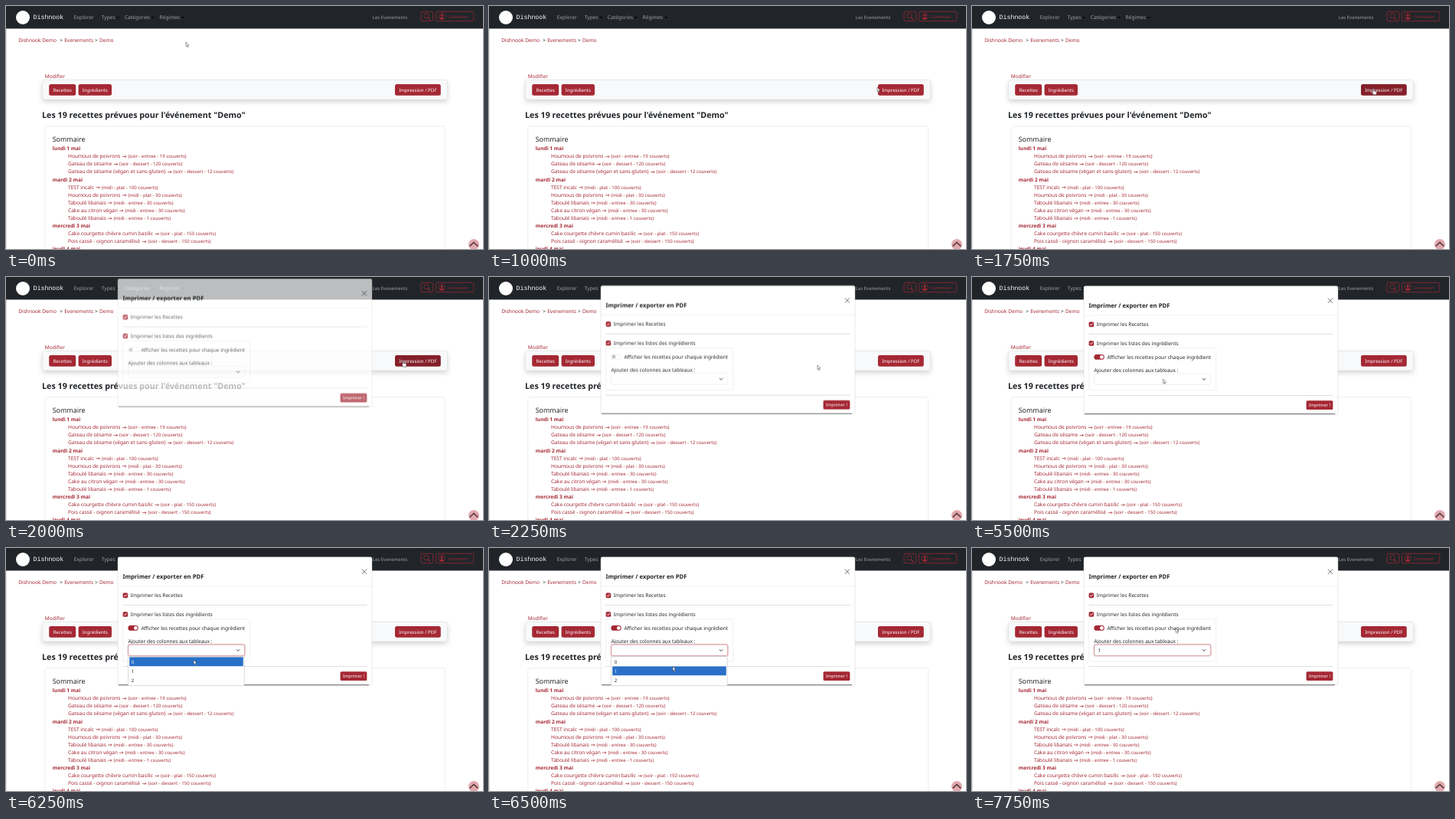
Write an HTML page that moves like this. It is 623 by 317 pixels and loops after 8000 ms.

```html
<!DOCTYPE html>
<html lang="fr">
<head>
<meta charset="utf-8">
<title>Impression des recettes</title>
<style>
html, body { margin: 0; width: 100%; height: 100%; overflow: hidden; background: #fff; }
svg { display: block; width: 623px; height: 317px; }
text { font: 6.6px "Noto Sans", sans-serif; fill: #212529; text-rendering: geometricPrecision; white-space: pre; }
.red text, text.red { fill: #a52834; }
.btn rect { fill: #a52834; }
.btn text { fill: #fff; font-size: 6.13px; }
.nav text { fill: #a0a3a5; }
.nav .caret { fill: #a0a3a5; }
.nav .brand { font: 8.25px "Liberation Mono", monospace; fill: #fff; }
.line { fill: none; stroke: #a52834; stroke-width: .7; }
.bold { font-weight: 700; }
.toolbar { filter: drop-shadow(0 3px 3px rgba(0, 0, 0, .16)); }
.small { font-size: 6.09px; }

/* One 8 s timeline in 250 ms beats (3.125 % each). */
.anim { animation: 8s step-end infinite; }
#cursor { animation-name: move; }
#arrow { animation-name: arrow; }
#hand { animation-name: hand; }
#print { animation-name: print; }
#modal { animation-name: modal; }
#off { animation-name: off; }
#on { animation-name: on; }
#ring { animation-name: ring; }
#menu { animation-name: menu; }
#pick { animation-name: pick; }
#zero { animation-name: zero; }
#one { animation-name: one; }
#value { animation-name: value; }

@keyframes move {
  0% { transform: translate(235px, 47px); }
  3.125% { transform: translate(262px, 53px); }
  6.25% { transform: translate(345px, 72px); }
  9.375% { transform: translate(448px, 95px); }
  12.5% { transform: translate(507px, 106px); }
  15.625%, 21.875% { transform: translate(523.5px, 107.5px); }
  25% { transform: translate(518px, 109px); }
  28.125% { transform: translate(429px, 115px); }
  31.25% { transform: translate(318px, 103px); }
  34.375% { transform: translate(239px, 88px); }
  37.5% { transform: translate(246px, 74px); }
  40.625% { transform: translate(268px, 86px); }
  43.75% { transform: translate(318px, 108px); }
  46.875% { transform: translate(352px, 120.7px); }
  50% { transform: translate(260px, 77px); }
  53.125% { transform: translate(243px, 96px); }
  56.25% { transform: translate(260px, 128px); }
  62.5% { transform: translate(181px, 108px); }
  65.625% { transform: translate(168px, 103px); }
  68.75%, 71.875% { transform: translate(249.5px, 133px); }
  78.125% { transform: translate(245px, 146px); }
  81.25%, 87.5% { transform: translate(240px, 154.5px); }
  90.625% { transform: translate(246px, 143px); }
  93.75% { transform: translate(259px, 119px); }
  96.875%, 100% { transform: translate(266px, 104.5px); }
}
@keyframes arrow { 0%, 28.125%, 100% { opacity: 1; } 15.625% { opacity: 0; } }
@keyframes hand { 0%, 28.125%, 100% { opacity: 0; } 15.625% { opacity: 1; } }
@keyframes print { 0%, 28.125%, 100% { fill: #a52834; } 15.625%, 21.875% { fill: #842029; } }
@keyframes modal {
  0% { opacity: 0; transform: translateY(-20px); }
  25% { opacity: .7; transform: translateY(-9.5px); }
  28.125% { opacity: 1; transform: translateY(-.4px); }
  31.25%, 100% { opacity: 1; transform: none; }
}
@keyframes off { 0% { opacity: 1; } 65.625%, 100% { opacity: 0; } }
@keyframes on { 0% { opacity: 0; } 65.625%, 100% { opacity: 1; } }
@keyframes ring { 0% { opacity: 0; } 71.875%, 100% { opacity: 1; } }
@keyframes menu { 0%, 87.5%, 100% { opacity: 0; } 71.875% { opacity: 1; } }
@keyframes pick {
  0% { opacity: 0; transform: translateY(-12px); }
  78.125% { opacity: 1; transform: translateY(-12px); }
  81.25%, 100% { opacity: 1; transform: none; }
}
@keyframes zero { 0%, 81.25%, 100% { fill: #212529; } 78.125% { fill: #fff; } }
@keyframes one { 0% { fill: #212529; } 81.25%, 100% { fill: #fff; } }
@keyframes value { 0% { opacity: 0; } 87.5%, 100% { opacity: 1; } }
</style>
</head>
<body>
<svg viewBox="0 0 623 317">
  <defs>
    <path id="caret" class="caret" d="M0 0h4l-2 2z"/>
    <g id="check">
      <rect width="6.6" height="6.6" rx="1.6" fill="#a52834"/>
      <path d="M1.7 3.4l1.2 1.2 2.1-2.5" fill="none" stroke="#fff" stroke-linecap="round" stroke-linejoin="round"/>
    </g>
  </defs>

  <rect width="623" height="317" fill="#fff"/>
  <path d="M.4 29v288" stroke="#d4d4d4" stroke-width=".8"/>

  <g class="nav">
    <rect width="623" height="29.5" fill="#212529"/>
    <circle cx="22" cy="15" r="9" fill="#fff"/>
    <text class="brand" x="35.6" y="17.2">Dishnook</text>
    <text x="88.7" y="17.4">Explorer</text>
    <text x="124.8" y="17.4">Types</text><use href="#caret" x="144.3" y="14.2"/>
    <text x="154.8" y="17.4">Catégories</text><use href="#caret" x="190" y="14.2"/>
    <text x="200.6" y="17.4">Régimes</text><use href="#caret" x="229" y="14.2"/>
    <text x="478.8" y="17" style="font-size:6px">Les Evenements</text>
    <g class="line">
      <rect x="542" y="7.3" width="15.7" height="12.4" rx="2"/>
      <rect x="561.4" y="7.3" width="49.4" height="12.4" rx="2"/>
      <circle cx="549" cy="12.8" r="3.2"/><path d="M551.4 15.2l2.6 2.6" stroke-width="1.1"/>
      <circle cx="569.2" cy="13.5" r="4.1"/>
    </g>
    <circle cx="569.2" cy="12.3" r="1.6" fill="#a52834"/>
    <path d="M566.2 16.1q3-3.2 6 0a4.1 4.1 0 0 1-6 0" fill="#a52834"/>
    <text x="576.9" y="15.7" style="font-size:5.3px;fill:#9a2936">Connexion</text>
  </g>

  <g class="red">
    <text x="16.2" y="47.2">Dishnook Demo</text>
    <text x="76.2" y="47.2">Evenements</text>
    <text x="121.9" y="47.2">Demo</text>
    <text x="50.8" y="93.7">Modifier</text>
  </g>
  <text x="70.3" y="47.2">&gt;</text>
  <text x="115.9" y="47.2">&gt;</text>

  <rect class="toolbar" x="47.7" y="96.5" width="528.8" height="25.4" rx="3" fill="#f8f9fa" stroke="#dedfe0" stroke-width=".6"/>
  <g class="btn">
    <rect x="56.2" y="102" width="35" height="14.7" rx="2.5"/><text x="61.5" y="111.6">Recettes</text>
    <rect x="94.6" y="102" width="43.4" height="14.7" rx="2.5"/><text x="99.7" y="111.6">Ingrédients</text>
    <rect id="print" class="anim" x="508" y="102" width="59.8" height="14.7" rx="2.5"/><text x="513.2" y="111.6">Impression / PDF</text>
  </g>

  <text class="bold" x="47" y="146.2" style="font-size:10.72px">Les 19 recettes prévues pour l'événement "Demo"</text>
  <rect x="50.8" y="156.8" width="523" height="180" rx="3" fill="#fff" stroke="#e0e1e2" stroke-width=".6"/>
  <text x="60.7" y="177.3" style="font-size:8.93px">Sommaire</text>
  <g id="list" class="red"></g>

  <circle cx="611" cy="311" r="7" fill="#e0a9ae"/>
  <path d="M605.7 313.4l5.3-5 5.3 5" fill="none" stroke="#5b3b40" stroke-width="1.5"/>

  <g id="modal" class="anim">
    <rect x="146" y="11.8" width="332" height="167" rx="2" fill="#fff" stroke="#c5c6c7" stroke-width=".4"/>
    <path d="M147 178.7h327" stroke="#555" stroke-width=".9"/>
    <text class="bold" x="152.4" y="40.4" style="font-size:7.72px">Imprimer / exporter en PDF</text>
    <path d="M464.8 27.6l6.4 6.4m0-6.4l-6.4 6.4" stroke="#777" stroke-width="1"/>
    <path d="M146 50h332" stroke="#dee2e6" stroke-width=".5"/>
    <path d="M152.5 74.5h319m-319 80h319" stroke="#c8c9ca" stroke-width=".6"/>
    <use href="#check" x="152.6" y="58.6"/><text x="162.8" y="64.3">Imprimer les Recettes</text>
    <use href="#check" x="152.6" y="83.2"/><text x="162.8" y="88.9">Imprimer les listes des ingrédients</text>
    <rect x="152.7" y="92.8" width="166" height="55" rx="2.5" fill="#fff" stroke="#e2e3e4" stroke-width=".5"/>
    <g id="off" class="anim">
      <rect x="159.6" y="101.2" width="13" height="6.5" rx="3.25" fill="#fff" stroke="#e2e4e6" stroke-width=".5"/>
      <circle cx="163" cy="104.4" r="2.4" fill="#bfbfbf"/>
    </g>
    <g id="on" class="anim">
      <rect x="159.4" y="101" width="13.4" height="6.8" rx="3.4" fill="#a52834"/>
      <circle cx="169.4" cy="104.4" r="2.4" fill="#fff"/>
    </g>
    <text x="176.4" y="106.8">Afficher les recettes pour chaque ingrédient</text>
    <text x="159.4" y="123.6">Ajouter des colonnes aux tableaux :</text>
    <rect x="159.7" y="126" width="152" height="14.5" rx="2.3" fill="#fff" stroke="#dee2e6" stroke-width=".5"/>
    <g id="ring" class="anim" fill="none">
      <rect x="159.3" y="125.6" width="152.8" height="15.3" rx="2.6" stroke="#edd4d6" stroke-width="1.8"/>
      <rect x="159.7" y="126" width="152" height="14.5" rx="2.3" stroke="#d2949a" stroke-width=".7"/>
    </g>
    <path d="M301 132.3l2.1 2.1 2.1-2.1" fill="none" stroke="#343a40" stroke-width="1"/>
    <text id="value" class="anim" x="164.6" y="135.8">1</text>
    <g class="btn">
      <rect x="436.6" y="161.2" width="34.8" height="11.9" rx="1.6"/>
      <text x="440" y="169.2" style="font-size:5.6px">Imprimer !</text>
    </g>
    <g id="menu" class="anim">
      <rect x="159.7" y="141.8" width="151.4" height="38" fill="#fff" stroke="#c4c4c4" stroke-width=".6"/>
      <rect id="pick" class="anim" x="161.2" y="154.4" width="148.6" height="11.8" fill="#2a70c8"/>
      <text id="zero" class="anim small" x="163.7" y="150.7">0</text>
      <text id="one" class="anim small" x="163.7" y="162.6">1</text>
      <text class="small" x="163.7" y="174.7">2</text>
    </g>
  </g>

  <g id="cursor" class="anim" fill="#fff" stroke="#333" stroke-width=".5" stroke-linejoin="round">
    <path id="arrow" class="anim" d="M0 0v5.6l1.2-1 1 2.1 1-.5-1-2 1.7-.2z"/>
    <path id="hand" class="anim" d="M0 .5q.6-.8 1.2 0V3.2l3 .7q.9.3.8 1.2l-.6 3.2H1L-1 5.3q0-.9 1 0z"/>
  </g>
</svg>
<script>
// [title, x of the detail, detail]; a lone string is a day heading.
const rows = [
  "lundi 1 mai",
  ["Houmous de poivrons", 159.5, "soir - entree - 19"],
  ["Gateau de sésame", 148.1, "soir - dessert - 120"],
  ["Gateau de sésame (végan et sans-gluten)", 218.6, "soir - dessert - 12"],
  "mardi 2 mai",
  ["TEST incalc", 124.8, "midi - plat - 100"],
  ["Houmous de poivrons", 159.5, "midi - plat - 30"],
  ["Taboulé libanais", 140.5, "midi - entree - 30"],
  ["Cake au citron végan", 155.5, "midi - entree - 30"],
  ["Taboulé libanais", 140.5, "midi - entree - 1"],
  "mercredi 3 mai",
  ["Cake courgette chèvre cumin basilic", 202, "soir - plat - 150"],
  ["Pois cassé - oignon caramélisé", 185.5, "soir - dessert - 150"],
  "jeudi 4 mai"
];
const label = (x, y, text, style = "") => `<text class="${style}" x="${x}" y="${y}">${text}</text>`;
document.getElementById("list").innerHTML = rows.map((row, i) => {
  const y = 188.2 + i * 10.09;
  if (typeof row === "string") return label(60.8, y, row, "bold");
  const [title, x, detail] = row;
  return label(81, y, title) + label(x, y, `(${detail} couverts)`, "small") +
    `<path class="line" d="M${x - 7.5} ${y - 1.9}h5m-1.5-1.5l1.5 1.5-1.5 1.5"/>`;
}).join("");
</script>
</body>
</html>
```
